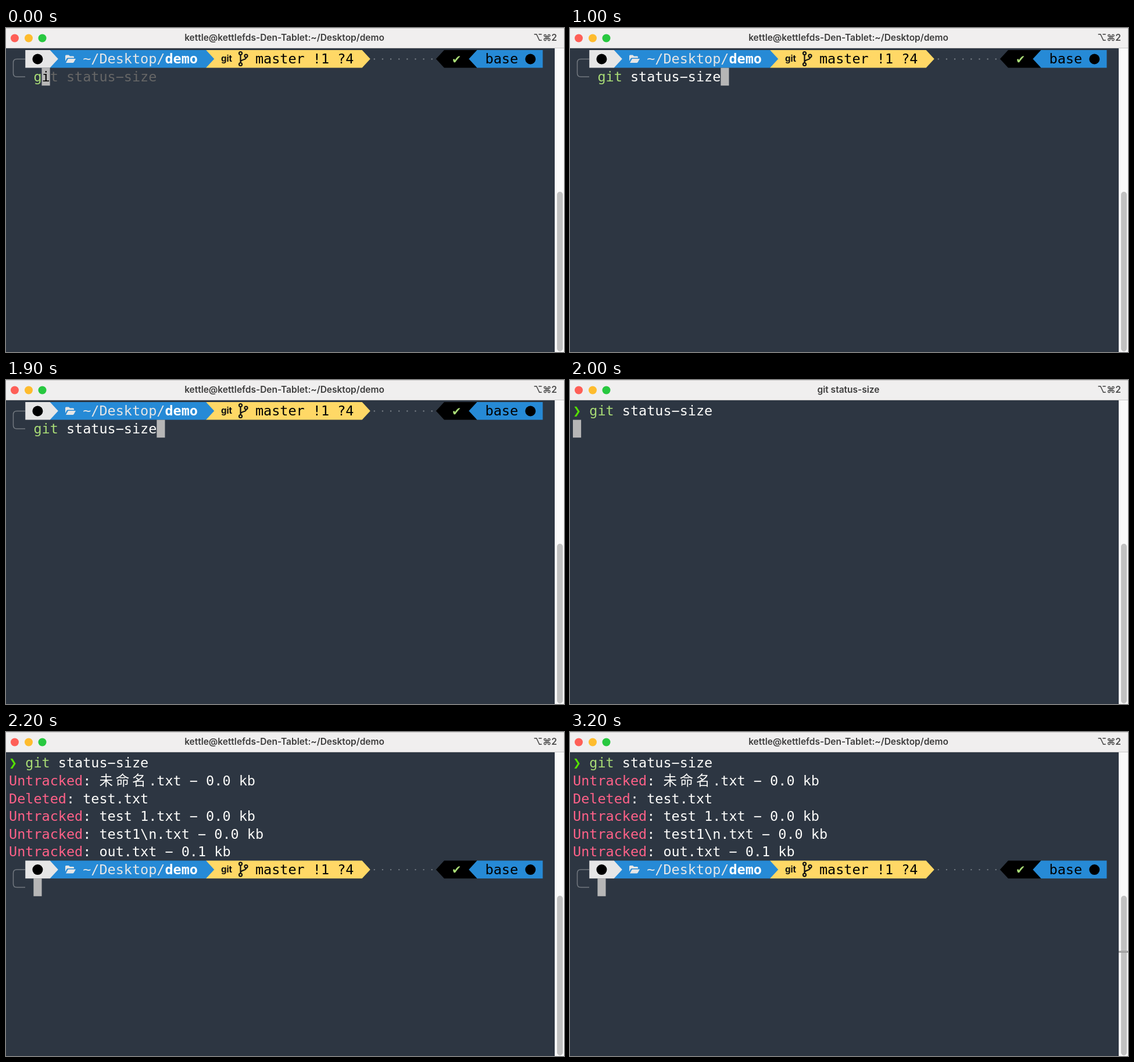
Animation, 960 px wide and 558 px high, one loop 3.5 s. Source, as an HTML page with a canvas:

```html
<!DOCTYPE html>
<html lang="en">
<head>
<meta charset="utf-8">
<title>Terminal</title>
<style>
  html, body { margin: 0; width: 100%; height: 100%; overflow: hidden; background: #2d3642; }
  canvas { display: block; }
</style>
</head>
<body>
<canvas id="stage" width="960" height="558"></canvas>
<script>
const ctx = document.getElementById('stage').getContext('2d');

const LOOP = 3500;
const ACCEPT = 1000, RUN = 2000, OUTPUT = 2100, PROMPT = 2200, MARK = 2300;

const CELL = 14.13, ROW = 30.6, LEFT = 5, TOP = 38;
const SIZE = 23.47;
const MONO = '"DejaVu Sans Mono", "Noto Sans CJK SC", "Noto Sans CJK", monospace';
const UI = 'Inter, "DejaVu Sans", sans-serif';

const BG = '#2d3642', WHITE = '#fcfcfa', GREEN = '#a9dc76', PINK = '#ff6188';
const YELLOW = '#ffd866', BLUE = '#268ad6', LIGHT = '#e6e6e6', CURSOR = '#b6b6b6';

const COMMAND = 'status-size';
const HOME_TITLE = 'kettle@kettlefds-Den-Tablet:~/Desktop/demo';
const OUTPUT_LINES = [
  ['Untracked', '未命名.txt - 0.0 kb'],
  ['Deleted', 'test.txt'],
  ['Untracked', 'test 1.txt - 0.0 kb'],
  ['Untracked', 'test1\\n.txt - 0.0 kb'],
  ['Untracked', 'out.txt - 0.1 kb']
];

const colX = col => LEFT + col * CELL;
const rowY = row => TOP + row * ROW;

function rect(x, y, w, h, color) {
  ctx.fillStyle = color;
  ctx.fillRect(x, y, w, h);
}

function dot(x, y, r, color) {
  ctx.fillStyle = color;
  ctx.beginPath();
  ctx.arc(x, y, r, 0, Math.PI * 2);
  ctx.fill();
}

function stroke(path, color, width) {
  ctx.strokeStyle = color;
  ctx.lineWidth = width;
  ctx.stroke(new Path2D(path));
}

function label(str, x, y, font, color, align = 'center') {
  ctx.font = font;
  ctx.fillStyle = color;
  ctx.textAlign = align;
  ctx.fillText(str, x, y);
}

// Writes on the character grid; CJK characters take two cells.
function write(str, col, row, color, weight = 400) {
  for (const ch of str) {
    const glyph = ch === '-' ? '−' : ch; // the terminal font has a wide hyphen
    label(glyph, colX(col), rowY(row) + 23.3, `${weight} ${SIZE}px ${MONO}`, color, 'left');
    col += ch > '\u2e80' ? 2 : 1;
  }
}

function cursor(col, row) {
  rect(colX(col), rowY(row), CELL, ROW, CURSOR);
}

// A prompt segment with a flat edge at one column and a point at the other.
function segment(flat, tip, row, color) {
  const neck = tip - Math.sign(tip - flat);
  const y = rowY(row);
  ctx.fillStyle = color;
  ctx.beginPath();
  ctx.moveTo(colX(flat), y);
  ctx.lineTo(colX(neck), y);
  ctx.lineTo(colX(tip), y + ROW / 2);
  ctx.lineTo(colX(neck), y + ROW);
  ctx.lineTo(colX(flat), y + ROW);
  ctx.fill();
}

function icons(row) {
  ctx.save();
  ctx.translate(0, rowY(row) - TOP);
  dot(colX(3.5), 53.5, 9, '#000');
  dot(colX(63.5), 53.5, 9, '#000');

  ctx.fillStyle = LIGHT;
  ctx.fill(new Path2D('M102 57V48q0-1.5 1.5-1.5h4.5l2 2h5.5q1.5 0 1.5 1.5v1.5h-10.5q-1.5 0-2.2 1.2z'));
  ctx.fill(new Path2D('M103 60l3.2-6q.5-1 1.6-1h12.2l-3.4 6q-.6 1-1.8 1z'));

  label('git', colX(26.5), 58, `700 15px ${UI}`, '#111');
  stroke('M403.5 46V60M413 51C413 56 403.5 53 403.5 59', '#111', 2.2);
  for (const [x, y] of [[403.5, 43.5], [413, 48], [403.5, 62.5]]) {
    dot(x, y, 3.6, '#111');
    dot(x, y, 1.5, YELLOW);
  }

  stroke('M33 53.5H18.5Q12.5 53.5 12.5 59.5V78Q12.5 84 18.5 84H33', '#737980', 1.5);
  for (let col = 44; col < 52; col++) dot(colX(col + 0.5), 53.5, 1.2, '#767d85');
  ctx.restore();
}

function prompt(row) {
  segment(24, 44, row, YELLOW);
  segment(5, 25, row, BLUE);
  segment(2, 6, row, LIGHT);
  segment(57, 52, row, '#000');
  segment(65, 56, row, BLUE);
  icons(row);
  write('~/Desktop/', 9, row, LIGHT);
  write('demo', 19, row, '#fff', 700);
  write('master !1 ?4', 30, row, '#000');
  label('✔', colX(54.5), rowY(row) + 22.5, `20px "DejaVu Sans", sans-serif`, GREEN);
  write('base', 58, row, '#000');
}

function windowFrame(title, marked) {
  rect(0, 0, 960, 558, BG);
  rect(0, 0, 960, 35, '#f0efef');
  rect(0, 0, 960, 1, '#cccccc');
  rect(0, 34, 960, 1, '#c9c8c8');
  dot(15, 17.5, 7, '#fe5f57');
  dot(39, 17.5, 7, '#febc2e');
  dot(62.5, 17.5, 7, '#28c840');
  label(title, 479, 22.3, `600 15.5px ${UI}`, '#3c3c3c');
  label('⌥⌘2', 948, 21.5, `600 15.5px ${UI}`, '#4a4a4a', 'right');

  rect(944, 35, 16, 523, '#fafafa');
  ctx.fillStyle = '#c1c1c1';
  ctx.beginPath();
  ctx.roundRect(948, 282, 10, 275, 5);
  ctx.fill();
  if (marked) {
    rect(944, 377, 16, 3, '#858585');
    rect(944, 378, 16, 1, '#c8c8c8');
  }
}

function typingScreen(accepted) {
  prompt(0);
  if (accepted) {
    write('git', 3, 1, GREEN);
    write(COMMAND, 7, 1, WHITE);
    cursor(18, 1);
  } else {
    write('g', 3, 1, GREEN);
    cursor(4, 1);
    write('i', 4, 1, '#000');
    write('t ' + COMMAND, 5, 1, '#666666');
  }
}

function resultScreen(t) {
  label('❯', colX(0.5), rowY(0) + 23.3, `${SIZE}px ${MONO}`, '#55e000');
  write('git', 2, 0, GREEN);
  write(COMMAND, 6, 0, WHITE);
  if (t < OUTPUT) return cursor(0, 1);

  OUTPUT_LINES.forEach(([status, file], i) => {
    write(status, 0, i + 1, PINK);
    write(': ' + file, status.length, i + 1, WHITE);
  });
  if (t < PROMPT) return cursor(0, 6);

  prompt(6);
  cursor(3, 7);
}

function draw(now) {
  const t = now % LOOP;
  const running = t >= RUN && t < PROMPT;
  windowFrame(running ? 'git ' + COMMAND : HOME_TITLE, t >= MARK);
  if (t < RUN) typingScreen(t >= ACCEPT);
  else resultScreen(t);
}

const start = performance.now();
function tick() {
  draw(performance.now() - start);
  requestAnimationFrame(tick);
}
tick();
</script>
</body>
</html>
```
